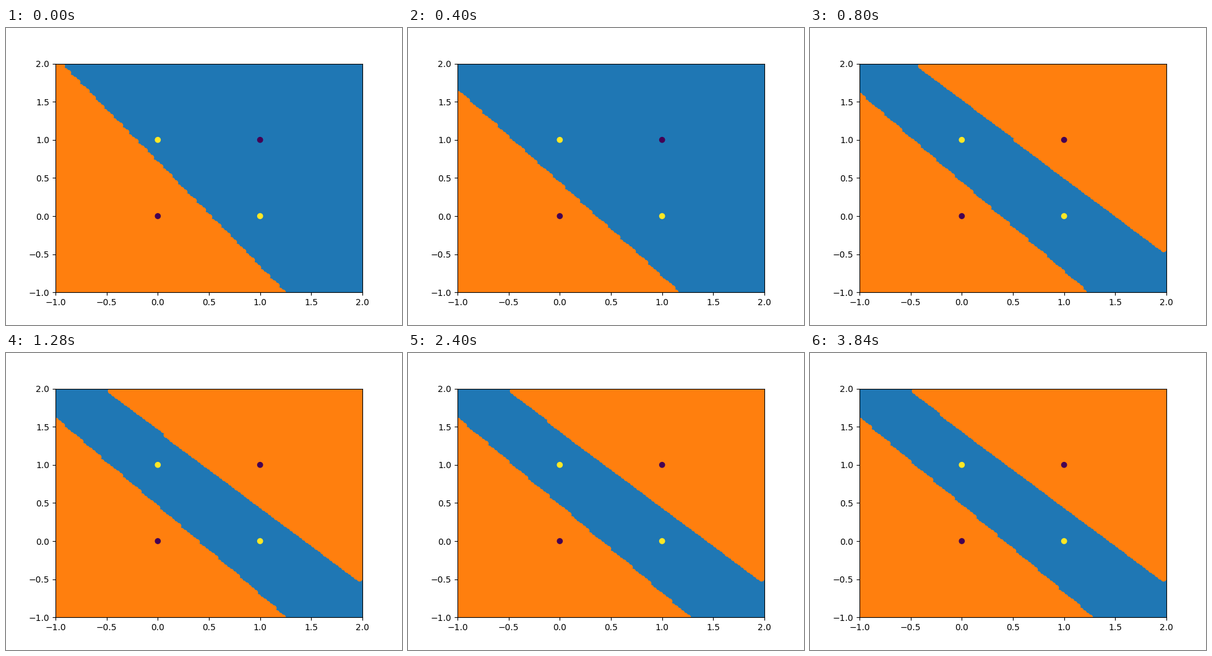
These frames come from a looping animation (640x480 px, 4000 ms). A matplotlib script:

```python
import numpy as np
import matplotlib.pyplot as plt
from matplotlib.animation import FuncAnimation

FRAMES = 50
STEP = 0.03
CELLS = 100
SWITCH = 6       # frame at which the upper region appears
FALL_TIME = 10   # frames the upper boundary takes to come down

col, row = (a.ravel() for a in np.meshgrid(np.arange(CELLS), np.arange(CELLS)))
points = np.column_stack((col, row)) * STEP - 1


def lower_line(frame):
    """Intercept and slope of the lower boundary, in grid cells."""
    if frame < SWITCH:
        left = (1 - frame / (SWITCH - 1)) ** 1.3
        return 87.75 + 14.04 * left, 1.2235 + 0.1465 * left
    w = settle(frame)
    return 86.495 - 0.3 * w - 0.41 * w**2, 1.1415 + 0.0485 * w


def upper_line(frame):
    """Intercept and slope of the upper boundary, in grid cells."""
    fall = max(0, 1 - (frame - SWITCH) / FALL_TIME)
    return 116.27 + 0.47 * settle(frame) + 3.06 * fall, 1.012 - 0.008 * fall


def settle(frame):
    """Decay from 1 at the switch, ever slower."""
    return 1 / (1 + (frame - SWITCH) / 5)


def height(line):
    intercept, slope = line
    return intercept - slope * col


fig, ax = plt.subplots(figsize=(6.4, 4.8), dpi=100)
ax.set_xlim(-1, 2)
ax.set_ylim(-1, 2)
inside = ax.scatter([], [], color="C0")
outside = ax.scatter([], [], color="C1")
ax.scatter([0, 0, 1, 1], [0, 1, 0, 1], c=[0, 1, 1, 0])


def update(frame):
    off = row <= height(lower_line(frame))
    if frame >= SWITCH:
        off |= row >= height(upper_line(frame))
    inside.set_offsets(points[~off])
    outside.set_offsets(points[off])
    return inside, outside


anim = FuncAnimation(fig, update, frames=FRAMES, interval=80,
                     repeat=True, repeat_delay=0)
plt.show()
```
